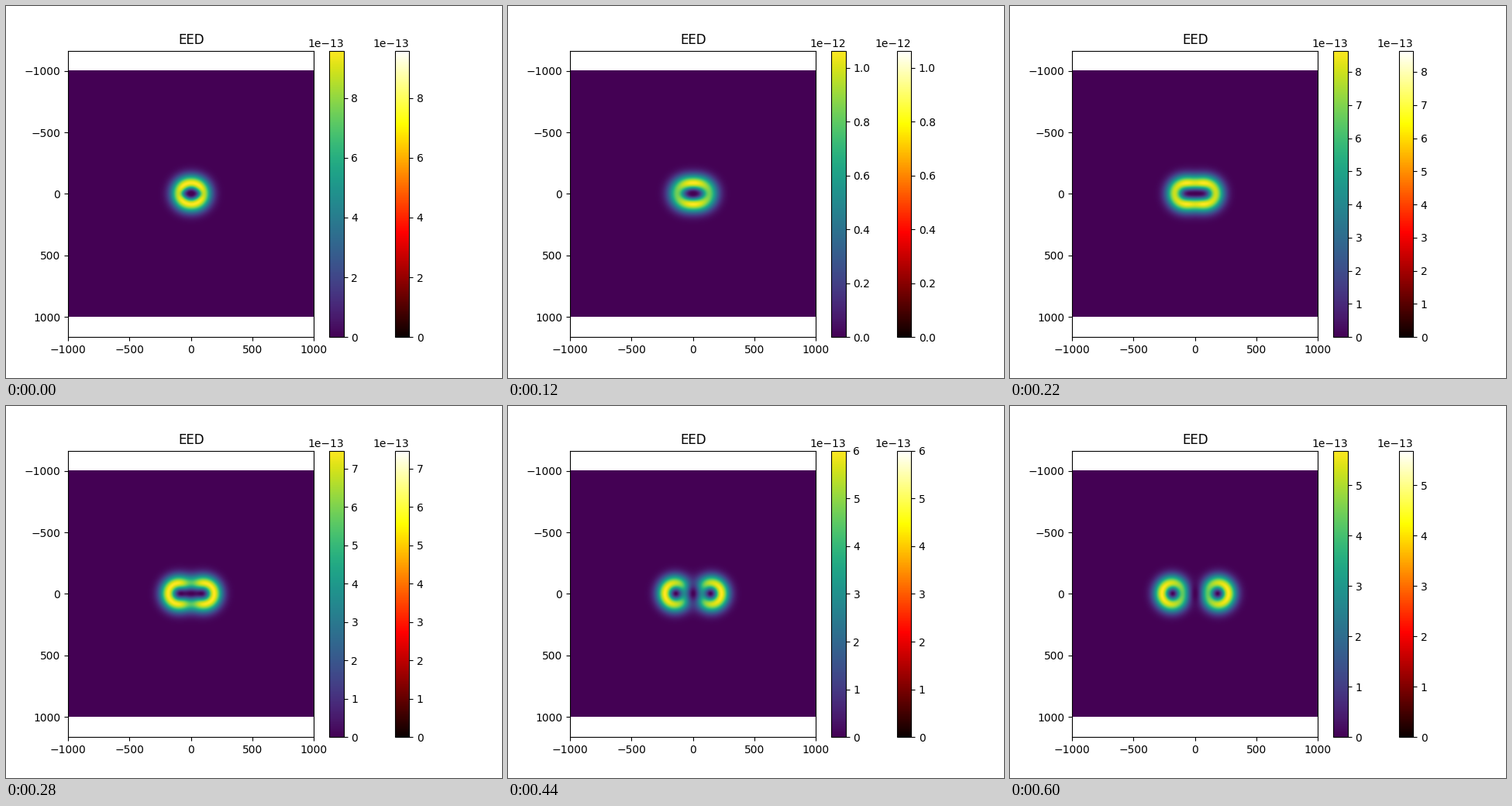
Recreate the animation shown at these times as a matplotlib script. Size 640x480 px, loop 0.62 s.

```python
import numpy as np
import matplotlib.pyplot as plt
from matplotlib.animation import FuncAnimation
from matplotlib.cm import ScalarMappable
from matplotlib.colors import Normalize

STEPS, INTERVAL = 31, 20
W, H = 640, 480
HALF = 1000
WIDTH = 123

# Peak energy density (in 1e-13) at chosen steps, joined smoothly.
KEY_STEPS = np.array([0, 6, 11, 14, 18, 22, 30])
KEY_PEAKS = np.array([9.58, 10.63, 8.64, 7.47, 6.47, 6.003, 5.69])
KEY_SLOPES = np.gradient(KEY_PEAKS, KEY_STEPS, edge_order=2)

axis = np.linspace(-HALF, HALF, 501)
X, Y = np.meshgrid(axis, axis)


def peak(n):
    """Cubic Hermite curve through the key peaks."""
    i = min(np.searchsorted(KEY_STEPS, n, side="right") - 1, len(KEY_STEPS) - 2)
    h = KEY_STEPS[i + 1] - KEY_STEPS[i]
    t = (n - KEY_STEPS[i]) / h
    p0, p1 = KEY_PEAKS[i:i + 2]
    m0, m1 = h * KEY_SLOPES[i:i + 2]
    value = ((2 * t**3 - 3 * t**2 + 1) * p0 + (t**3 - 2 * t**2 + t) * m0
             + (3 * t**2 - 2 * t**3) * p1 + (t**3 - t**2) * m1)
    return value * 1e-13


def density(n):
    """Energy of two radial fields drifting apart along x."""
    d = 30 + 5.1 * n
    left, right = X + d, X - d
    g_left = np.exp(-(left**2 + Y**2) / WIDTH**2)
    g_right = np.exp(-(right**2 + Y**2) / WIDTH**2)
    ex = left * g_left + right * g_right
    ey = Y * (g_left + g_right)
    outward = 1 + (0.25 + 0.0024 * d) * X**2 / (X**2 + 140**2)
    depth = np.exp(-(d / 90)**4)
    hole = 1 - depth * np.exp(-(X / 62)**2 - (Y / 30)**2)
    e = (ex**2 + ey**2) * outward * hole
    return e / e.max() * peak(n)


def box(x, width):
    return [x / W, 0.11, width / W, 0.77]


fig = plt.figure(figsize=(6.4, 4.8), dpi=100)
ax = fig.add_axes(box(80, 317.44))
ax.set_title("EED")
norm = Normalize(0, peak(0))
image = ax.imshow(density(0), extent=[-HALF, HALF, HALF, -HALF], cmap="viridis",
                  norm=norm, aspect="auto", interpolation="bilinear")
reach = HALF * 369.6 / 317.44
ax.set_xlim(-HALF, HALF)
ax.set_ylim(reach, -reach)

heat = ScalarMappable(norm=Normalize(0, peak(0)), cmap="hot")
for source, x in ((image, 417.28), (heat, 501.6)):
    bar = fig.colorbar(source, cax=fig.add_axes(box(x, 18.48)))
    bar.ax.yaxis.set_offset_position("right")


def update(n):
    top = peak(n)
    image.set_data(density(n))
    image.set_clim(0, top)
    heat.set_clim(0, top)
    return []


anim = FuncAnimation(fig, update, frames=STEPS, interval=INTERVAL,
                     init_func=lambda: update(0), repeat=True,
                     repeat_delay=0, blit=False)
plt.show()
```
